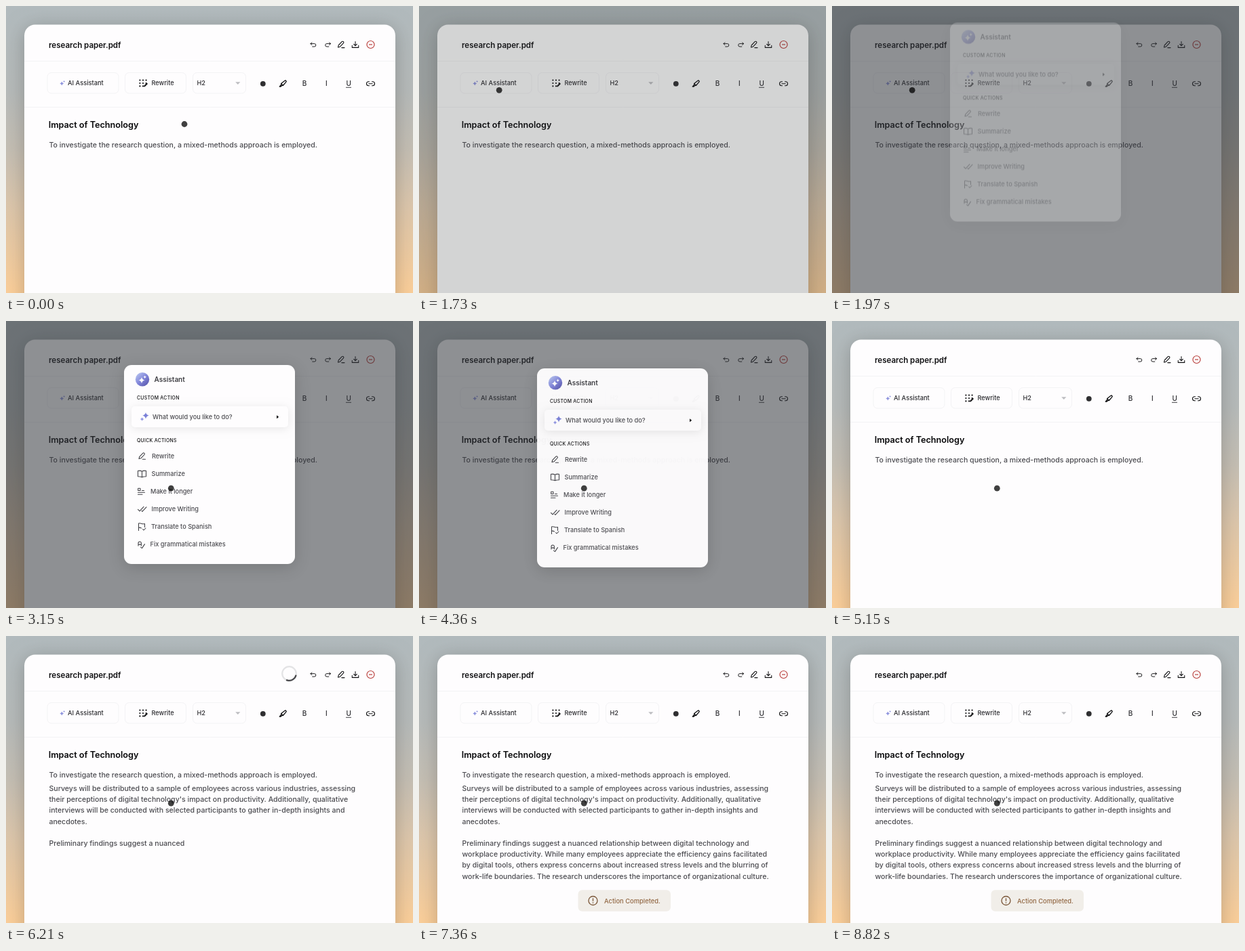
Recreate the animation shown at these times as an HTML page with a canvas. Size 600 by 424 pixels, loop 8970 ms.

```html
<!DOCTYPE html>
<html lang="en">
<head>
<meta charset="utf-8">
<title>Document assistant</title>
<style>
  html, body { margin: 0; width: 100%; height: 100%; overflow: hidden; background: #b0b8ba; }
  canvas { display: block; width: 600px; height: 424px; }
</style>
</head>
<body>
<canvas id="stage"></canvas>
<script>
const W = 600, H = 424, LOOP = 8970;
const dpr = window.devicePixelRatio || 1;
const stage = document.getElementById('stage');
const ctx = setup(stage);

const INK = '#111113', BODY = '#4b4b50', LINE = '#f3f3f5', PAPER = '#fefdfe';
const BODY_SIZE = 10.58, LABEL_SIZE = 9.2;

const PATHS = {
  undo: 'M-2.5-4-4.5-2-2.5 .2M-4.5-2H1.8A2.5 2.5 0 0 1 1.8 3H-1.5',
  pen: 'M-4.5 4-3.8 1 1.2-4.3a1.5 1.5 0 0 1 2.2 2.2L-1.6 3.2ZM.8 4.6H5',
  download: 'M0-5V1.5M-2.5-1 0 1.5 2.5-1M-5 1V4.3H5V1',
  link: 'M-2-3H-3A3 3 0 0 0-3 3H-2M2-3H3A3 3 0 0 1 3 3H2M-2.6 0H2.6',
  marker: 'M-5 4.4H-3L-1.6 3 .6 2.6 5-2.6a1.4 1.4 0 0 0-2-2L-2.4-.4-2.6 2ZM-2 .4 .4 2.4',
  book: 'M0-3.5C-2-5-5-4.5-6-4.5V4C-4 4-2 4 0 5 2 4 4 4 6 4V-4.5C5-4.5 2-5 0-3.5V5',
  longer: 'M-4.8-4.5H-1.5V-1.3H-4.8ZM1-1.3H4M-5 1.5H5M-5 4.5H1.5',
  checks: 'M-6 .5-3.5 3 2.5-3.5M-.5 2.5 .5 3.5 6.5-3',
  flag: 'M-5 5.5V-5C-2-6.5 0-3 4-4.5V.5M-5 1.5C-3 .5-2 1.5-1 2M1 3.5 2.5 5 5.5 2',
  grammar: 'M-4.5 2V-2A2.2 2.2 0 0 1-.1-2V2M-4.5 0H-.1M-1 4 1 5.5 5-.5'
};

const ACTIONS = [
  ['pen', 200.5, 'Rewrite', 215],
  ['book', 200.5, 'Summarize', 214.5],
  ['longer', 199.5, 'Make it longer', 213],
  ['checks', 200.5, 'Improve Writing', 214.5],
  ['flag', 200.5, 'Translate to Spanish', 214],
  ['grammar', 199.5, 'Fix grammatical mistakes', 212.5]
];

const LINES = [
  'Surveys will be distributed to a sample of employees across various industries, assessing',
  "their perceptions of digital technology's impact on productivity. Additionally, qualitative",
  'interviews will be conducted with selected participants to gather in-depth insights and',
  'anecdotes.',
  '',
  'Preliminary findings suggest a nuanced relationship between digital technology and',
  'workplace productivity. While many employees appreciate the efficiency gains facilitated',
  'by digital tools, others express concerns about increased stress levels and the blurring of',
  'work-life boundaries. The research underscores the importance of organizational culture.'
];

function setup(canvas) {
  canvas.width = W * dpr;
  canvas.height = H * dpr;
  const c = canvas.getContext('2d');
  c.scale(dpr, dpr);
  return c;
}

function layer(draw) {
  const canvas = document.createElement('canvas');
  draw(setup(canvas));
  return canvas;
}

function text(c, str, x, y, size, color = INK, weight = 500, spacing = 0) {
  c.font = `${weight} ${size}px Inter, sans-serif`;
  c.letterSpacing = spacing + 'px';
  c.fillStyle = color;
  c.fillText(str, x, y);
}

function box(c, x, y, w, h, r, fill, stroke) {
  c.beginPath();
  c.roundRect(x, y, w, h, r);
  if (fill) { c.fillStyle = fill; c.fill(); }
  if (stroke) { c.strokeStyle = stroke; c.lineWidth = 1; c.stroke(); }
}

function shadowBox(c, x, y, w, h, r, blur, alpha, dy) {
  c.save();
  c.shadowColor = `rgba(0,0,0,${alpha})`;
  c.shadowBlur = blur * dpr;
  c.shadowOffsetY = dy * dpr;
  box(c, x, y, w, h, r, PAPER);
  c.restore();
}

function disc(c, x, y, r, fill) {
  c.beginPath();
  c.arc(x, y, r, 0, Math.PI * 2);
  c.fillStyle = fill;
  c.fill();
}

function ring(c, x, y, r, color, width, from = 0, to = Math.PI * 2) {
  c.beginPath();
  c.arc(x, y, r, from, to);
  c.strokeStyle = color;
  c.lineWidth = width;
  c.stroke();
}

function rule(c, x1, y1, x2, y2, color, width = 1) {
  c.beginPath();
  c.moveTo(x1, y1);
  c.lineTo(x2, y2);
  c.strokeStyle = color;
  c.lineWidth = width;
  c.stroke();
}

function icon(c, name, x, y, { color = INK, width = 1.1, scale = 1, flip = false } = {}) {
  c.save();
  c.translate(x, y);
  c.scale(flip ? -scale : scale, scale);
  c.lineCap = c.lineJoin = 'round';
  c.strokeStyle = color;
  c.lineWidth = width;
  c.stroke(new Path2D(PATHS[name]));
  c.restore();
}

function star(c, x, y, r, fill) {
  const k = r * 0.18;
  c.beginPath();
  c.moveTo(x, y - r);
  c.quadraticCurveTo(x + k, y - k, x + r, y);
  c.quadraticCurveTo(x + k, y + k, x, y + r);
  c.quadraticCurveTo(x - k, y + k, x - r, y);
  c.quadraticCurveTo(x - k, y - k, x, y - r);
  c.fillStyle = fill;
  c.fill();
}

function triangle(c, x1, y1, x2, y2, x3, y3, fill) {
  c.beginPath();
  c.moveTo(x1, y1);
  c.lineTo(x2, y2);
  c.lineTo(x3, y3);
  c.fillStyle = fill;
  c.fill();
}

function drawPage(c) {
  const sky = c.createLinearGradient(0, 0, 0, H);
  sky.addColorStop(0, '#b1babd');
  sky.addColorStop(0.3, '#b6bab9');
  sky.addColorStop(0.5, '#c4beb3');
  sky.addColorStop(0.7, '#dcc6ab');
  sky.addColorStop(1, '#fbce99');
  c.fillStyle = sky;
  c.fillRect(0, 0, W, H);
  shadowBox(c, 27, 27.5, 547, 440, 16, 28, 0.22, 4);

  text(c, 'research paper.pdf', 63, 61.6, 11.55, INK, 600);
  icon(c, 'undo', 453, 57.4, { scale: 0.88 });
  icon(c, 'undo', 474.5, 57.4, { scale: 0.88, flip: true });
  icon(c, 'pen', 494, 57);
  icon(c, 'download', 515, 57.3, { scale: 0.95 });
  ring(c, 537.5, 57, 5.5, '#b9403d', 1.2);
  rule(c, 535, 57, 540, 57, '#b9403d', 1.2);
  rule(c, 27, 81.5, 574, 81.5, LINE);
  rule(c, 27, 149.5, 574, 149.5, LINE);

  [[61, 105], [175.5, 90], [275.5, 78]].forEach(([x, w]) => box(c, x, 98.5, w, 30.5, 6, null, LINE));
  star(c, 82.3, 114.4, 3, '#8d92dd');
  star(c, 85.6, 111.6, 1.5, '#8d92dd');
  text(c, 'AI Assistant', 91, 117.2, LABEL_SIZE + 0.1, '#2c2c30');

  for (let i = 0; i < 8; i++) {
    disc(c, 197.4 + (i % 3) * 4.6, 109.6 + Math.floor(i / 3) * 4.4, 1.1, INK);
  }
  rule(c, 203.5, 119, 208.3, 114.3, INK, 2);
  text(c, 'Rewrite', 214.5, 117.2, LABEL_SIZE, '#2c2c30');
  text(c, 'H2', 281.5, 117.2, LABEL_SIZE, '#2c2c30');
  triangle(c, 338.2, 112.2, 345.4, 112.2, 341.8, 116, '#bdbdc0');

  disc(c, 378.8, 114.8, 3.9, '#2f2f31');
  icon(c, 'marker', 408, 114.8, { width: 1.4, scale: 0.95 });
  text(c, 'B', 436.8, 118.2, 10, '#2c2c30');
  text(c, 'I', 471, 118.2, 10, '#2c2c30');
  text(c, 'U', 501.4, 118.2, 10, '#2c2c30');
  rule(c, 501, 120.3, 509, 120.3, '#2c2c30', 0.9);
  icon(c, 'link', 537.5, 114.8);

  text(c, 'Impact of Technology', 62.7, 180.4, 12.65, '#08080a', 600);
  text(c, 'To investigate the research question, a mixed-methods approach is employed.', 63.5, 208.6, BODY_SIZE, BODY);
}

function drawModal(c) {
  shadowBox(c, 174, 65, 252, 294, 11, 24, 0.16, 5);
  const orb = c.createLinearGradient(193, 78, 209, 95);
  orb.addColorStop(0, '#b3c0ee');
  orb.addColorStop(0.5, '#8286da');
  orb.addColorStop(1, '#5a59ad');
  disc(c, 201, 86.3, 10.2, orb);
  star(c, 200, 87.5, 4.6, '#fff');
  star(c, 204.7, 82.8, 2.2, '#fff');
  text(c, 'Assistant', 218.5, 90, 10, '#3d3d42', 600);

  text(c, 'CUSTOM ACTION', 193, 115.5, 6.9, INK, 500, 0.3);
  shadowBox(c, 185, 126, 231, 31, 5, 13, 0.09, 2);
  star(c, 206, 139.8, 4.7, '#7a80d8');
  star(c, 200.6, 145, 2.7, '#8f94e2');
  text(c, 'What would you like to do?', 216, 145.1, LABEL_SIZE, BODY);
  triangle(c, 399, 139.3, 402.2, 141.8, 399, 144.3, INK);

  text(c, 'QUICK ACTIONS', 193, 179, 6.9, INK, 500, 0.3);
  ACTIONS.forEach(([name, ix, label, x], i) => {
    const y = 199.3 + i * 26.1;
    icon(c, name, ix, y + 0.3, { color: '#3f3f44', width: 1.05 });
    text(c, label, x, y + 3.3, LABEL_SIZE, BODY);
  });
}

function drawToast(c) {
  const brown = '#7a5638';
  box(c, 234.5, 375.3, 136.5, 31.5, 6, '#f1eee9');
  ring(c, 256.5, 391, 6.5, brown, 1.3);
  rule(c, 256.5, 387.4, 256.5, 391.8, brown, 1.3);
  disc(c, 256.5, 394.1, 0.8, brown);
  text(c, 'Action Completed.', 273, 394.6, 9.35, '#926844');
}

const page = layer(drawPage), modal = layer(drawModal), toast = layer(drawToast);

const progress = (t, a, b) => Math.min(1, Math.max(0, (t - a) / (b - a)));
const ease = p => p < 0.5 ? 4 * p ** 3 : 1 - 4 * (1 - p) ** 3;
const eased = (t, a, b) => ease(progress(t, a, b));
const mix = (a, b, p) => a + (b - a) * p;

function paste(img, alpha, dy = 0) {
  if (alpha <= 0) return;
  ctx.globalAlpha = alpha;
  ctx.drawImage(img, 0, dy, W, H);
  ctx.globalAlpha = 1;
}

// Words pop in one after another at a steady character rate.
function drawTyped(t) {
  let left = (t - 5418) * 0.4;
  LINES.forEach((line, i) => {
    if (left >= 0) {
      const cut = left >= line.length ? -1 : line.indexOf(' ', Math.floor(left));
      text(ctx, cut < 0 ? line : line.slice(0, cut), 63.5, 229 + i * 16.2, BODY_SIZE, BODY);
    }
    left -= line.length + 1;
  });
}

function drawSpinner(t) {
  const alpha = progress(t, 5910, 6000) - progress(t, 6680, 6780);
  if (alpha <= 0) return;
  const from = 0.2 + (t - 6210) / 900 * Math.PI * 2;
  ctx.globalAlpha = alpha;
  ring(ctx, 417.5, 55.5, 10.3, '#e3e3e5', 2.2);
  ring(ctx, 417.5, 55.5, 10.3, '#48484b', 2.3, from, from + 1.8);
  ctx.globalAlpha = 1;
}

function drawCursor(t) {
  const reach = eased(t, 200, 1300), leave = eased(t, 2200, 2990);
  const x = mix(mix(263, 118.2, reach), 243.3, leave);
  const y = mix(mix(174.5, 124.3, reach), 247.2, leave);
  disc(ctx, x, y, 4.4, 'rgba(0,0,0,.75)');
}

function render(t) {
  paste(page, 1);
  drawTyped(t);
  drawSpinner(t);

  const dim = progress(t, 1640, 1875) - progress(t, 4380, 4750);
  ctx.fillStyle = `rgba(52,56,60,${0.55 * dim})`;
  ctx.fillRect(0, 0, W, H);

  const enter = eased(t, 1800, 2250), exit = eased(t, 4230, 4835);
  paste(modal, enter - exit, -52 * (1 - enter) + 122 * exit);
  paste(toast, eased(t, 7100, 7400));
  drawCursor(t);
}

function tick() {
  render(performance.now() % LOOP);
  requestAnimationFrame(tick);
}
tick();
</script>
</body>
</html>
```
